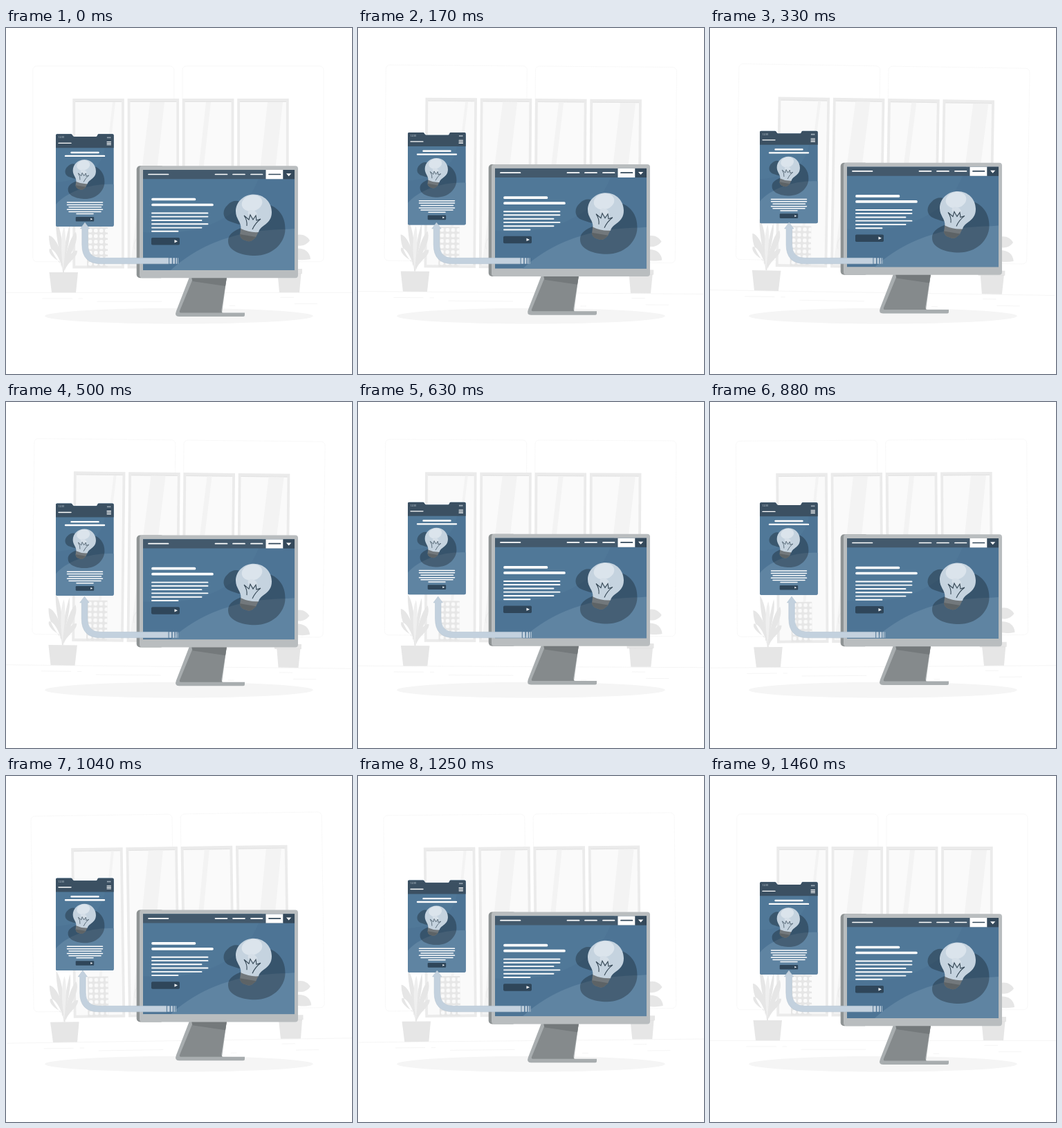
Animation of 500 by 500 pixels, one loop 1.5 s. Source, as an HTML page:

```html
<!DOCTYPE html>
<html lang="en">
<meta charset="utf-8">
<title>Responsive design</title>
<style>
  html, body { margin: 0; height: 100%; overflow: hidden; background: #fff }
  svg { display: block; width: 100vw; height: 100vh }
  .line { fill: none; stroke-linecap: round; stroke: #fff }
</style>
<svg viewBox="0 0 500 500">
  <defs>
    <clipPath id="screenClip"><path d="M198 205H417V350H198Z"/></clipPath>
    <clipPath id="phoneClip"><path id="phoneShape" d="M74 153.3H94Q95.300 153.300 96 155T98 157H130.500Q131.500 157 132.200 155T134 153.300H153.700Q155.700 153.300 155.700 155.300V284.700Q155.700 286.700 153.700 286.700H74Q72 286.700 72 284.700V155.300Q72 153.300 74 153.300Z"/></clipPath>
    <!-- Bulb and its shadow, centred on the glass -->
    <g id="bulb">
      <g opacity=".27">
        <path d="M-11 15C-18 20-26 15-33 13C-46 9-46-4-38-11C-30-20-19-18-15-12Z"/>
        <path d="M20-12C34-9 46 4 45.500 24C45 45 26 62 2 62C-18 62-37 55-37 41C-37 26-19 24-10 17Z"/>
      </g>
      <path d="M-18.500 20.500L7 27L3 35.500L-1 39Q-4 42-9 41L-15 39Q-19 37-20 32Z" fill="#72787c"/>
      <path d="M-20 31L3.500 35L-1 39Q-4 42-9 41L-15 39Q-19 37-20 32Z" fill="#5d6366"/>
      <path d="M-18.500 23C-18 13-26 9-26-2C-26-16-14-26.500 0-26.500C15-26.500 26-15 26-1C26 17 10 17 7 28Q-6 29-18.500 23Z" fill="#c5d3df"/>
      <ellipse cx="-2.500" cy="-14" rx="15" ry="11.500" transform="rotate(-14 -2.500 -14)" fill="#dbe4ec"/>
      <ellipse cx="-1" cy="2" rx="7" ry="5" transform="rotate(25)" fill="#d5dfe8"/>
      <path d="M-10 19Q-9 11-14 4L-7 10L-5 3L-1 10L3 4L4 11L10 9Q2 15-2 24" fill="none" stroke="#344654" stroke-width="1.100"/>
    </g>
    <g id="window">
      <path d="M0 0H74.500V245.500H0Z" fill="#ebebeb"/>
      <path d="M3.800 5H70.700V241.500H3.800Z" fill="#fafafa"/>
      <path d="M3.800 4.500H70.700" stroke="#e0e0e0" stroke-width=".8"/>
    </g>
    <pattern id="weave" x="118" y="289" width="8" height="8" patternUnits="userSpaceOnUse">
      <rect x="1" y="1" width="5.500" height="5.500" rx="2" fill="#fafafa"/>
    </pattern>
  </defs>

  <g id="room">
    <path d="M0 382.500H500M416.800 398.600h33.100M322.500 401.300h8.700M396.600 389.300h19.200M52.500 391h43.200M104.600 391h6.300M131.500 395.200h93.700" stroke="#ebebeb" stroke-width=".5"/>
    <g fill="none" stroke="#ebebeb" stroke-width=".35">
      <rect x="38.800" y="55" width="204" height="282.800" rx="5.700"/>
      <rect x="255" y="55" width="204" height="282.800" rx="5.700"/>
    </g>
    <use href="#window" x="96.300" y="102"/>
    <use href="#window" x="175.600" y="102"/>
    <use href="#window" x="254.900" y="102"/>
    <use href="#window" x="334.200" y="102"/>
    <path d="M154 107H158L132 343H128ZM208 107H229L203 343H180ZM289 107H296L270 343H263ZM378 107H400L374 343H352Z" fill="#f3f3f3"/>
    <path d="M117 288H147V346H117Z" fill="#e6e6e6"/>
    <path d="M117 288H147V346H117Z" fill="url(#weave)"/>
    <path d="M189 304Q183 312 186 320" fill="none" stroke="#ebebeb"/>
    <g fill="#e6e6e6">
      <path d="M82 353C81 330 72 310 72 279C79 288 82 310 83 330C84 318 88 297 92 284C95 305 85 325 84 353Z"/>
      <path d="M82 345C69 329 62 318 62 300C70 300 82 322 83 345ZM82 349C78 333 70 319 63 319C60 325 70 334 77 337ZM83 348C86 325 94 299 101 295C106 311 92 325 85 348ZM84 350C88 329 98 320 103 322C103 332 90 337 85 350Z"/>
      <path d="M62.500 353H104L101 382.300H66Z"/>
      <path d="M389 348H428V355H426.500L424 382H395L392.500 355H389Z"/>
      <path d="M415 301C425 296 434 299 439 307C432 317 420 316 412 311Z"/>
      <path d="M414 320C425 316 439 320 440 334C430 336 417 336 412 330Z"/>
    </g>
    <path d="M83 350C79 325 79 298 84 287C88 301 85 326 83 350" fill="#efefef"/>
    <path d="M389.500 355H426.500" stroke="#dedede" stroke-width=".7"/>
  </g>

  <ellipse cx="250" cy="416.200" rx="193.900" ry="11.300" fill="#f5f5f5"/>

  <g id="devices">
    <path d="M265 360L246 409Q243 417 250 417H343Q345 417 345 415V411.500H312L319 360Z" fill="#a8adaf"/>
    <path d="M271 360H319L311.300 407Q311 411.500 314 411.500H252Q250 411 251.300 408Z" fill="#858a8c"/>
    <path d="M268 360H319L317 373L269.500 366Z" fill="#74797b"/>
    <rect x="188.700" y="199.300" width="40" height="162" rx="5" fill="#8e9394"/>
    <rect x="193" y="199.300" width="229" height="162" rx="4" fill="#b9bdbf"/>
    <g clip-path="url(#screenClip)">
      <path d="M198 205H417V350H198Z" fill="#4d7495"/>
      <path d="M198 205H370C361 231 349 254 326 268C290 292 245 300 198 295Z" fill="#507898"/>
      <path d="M238 350C270 321 303 307 339 298C367 291 390 292 417 290V350Z" fill="#5f84a2"/>
      <path d="M198 205H417V218.300H198Z" fill="#43596c"/>
      <path d="M375.500 205H400.500V218.300H375.500Z" fill="#fff"/>
      <path d="M400.500 205H417V218.300H400.500Z" fill="#34495b"/>
    </g>
    <path d="M405 210.300H412.300L408.600 214.300Z" fill="#fff"/>
    <path class="line" stroke-width="1.700" d="M206 211.500H234.500M302.500 211.500H319.500M328 211.500H345M354 211.500H370.500"/>
    <path d="M380 211.500H396.500" stroke="#34495b" stroke-width="1.700" stroke-linecap="round"/>
    <path class="line" stroke-width="3.700" d="M212 247.500H272.500M212 255.500H298"/>
    <path class="line" stroke-width="1.900" d="M211 267.500H291.500M211 272.600H291.500M211 278H282.500M211 283.200H291.500M211 288.600H282.500M211 293.800H248.500"/>
    <rect x="210" y="303" width="41" height="10.500" rx="1.800" fill="#2f465a"/>
    <path d="M243.500 306L248 308.200L243.500 310.400Z" fill="#fff"/>
    <use href="#bulb" x="358" y="267"/>

    <use href="#phoneShape" fill="#4d7495"/>
    <g clip-path="url(#phoneClip)">
      <path d="M72 173H143C140 195 124 219 72 223Z" fill="#507898"/>
      <path d="M72 255C88 236 124 224 156 226V287H72Z" fill="#5f84a2"/>
      <path d="M72 153H156V173.300H72Z" fill="#3b5062"/>
    </g>
    <text x="75.800" y="159.300" font-family="Lato, sans-serif" font-size="3.200" fill="#c5d0d9">12:30</text>
    <path d="M146 158.300H151.500" stroke="#a9b6c1" stroke-width="1.800" stroke-dasharray="1.500 .4"/>
    <path class="line" stroke-width="1.400" d="M76 166.400H94"/>
    <path class="line" stroke-width="1.100" d="M146 164.500H151.500M146 166.600H151.500M146 168.700H151.500"/>
    <path class="line" stroke-width="2.400" d="M94.500 180H133.500M86 184.900H142"/>
    <use href="#bulb" transform="translate(113.300 207.300) scale(.64)"/>
    <path class="line" stroke-width="1.500" d="M88.500 252H139.500M88.500 255.400H139.500M91 258.800H137.500M88.500 262.200H139.500M91 265.400H137M102 268.500H126"/>
    <rect x="100.700" y="272.900" width="26.500" height="6.600" rx="1.100" fill="#2f465a"/>
    <path d="M122.300 274.800L125.200 276.200L122.300 277.600Z" fill="#fff"/>
  </g>

  <g id="arrow">
    <path d="M114 281L120.700 290H118.300V313Q118.300 332.300 137 332.300H235V340.800H137Q109.800 340.800 109.800 313V290H107.300Z" fill="#c3d1de" stroke="#b1c1cf" stroke-width=".5"/>
    <path d="M236.200 332.300h3.600v8.500h-3.600zM241.300 332.300h2.700v8.500h-2.700zM245.400 332.300h1.600v8.500h-1.600zM248.300 332.300h.8v8.500h-.8z" fill="#c3d1de"/>
  </g>
</svg>
<script>
  const FPS = 24, STEPS = 35, LOOP = 1500;
  const part = id => document.getElementById(id);
  const room = part('room'), devices = part('devices'), arrow = part('arrow');

  // Evenly spaced keys, linear in between
  function along(keys, u) {
    const x = u * (keys.length - 1), i = Math.min(Math.floor(x), keys.length - 2);
    return keys[i] + (keys[i + 1] - keys[i]) * (x - i);
  }

  function draw(now) {
    const step = Math.min(STEPS, Math.floor((now % LOOP + 4.9) * FPS / 1000));
    const u = step / STEPS;
    room.setAttribute('transform', `rotate(${along([0, 1, 0, -1, 0], u)} 250 250)`);
    devices.setAttribute('transform', `translate(0 ${along([0, -10, 0], u)})`);
    arrow.setAttribute('transform', `translate(${along([0, -1, 2, -4, 4, -4, 4, -4, 2, -1, 0], u)} 0)`);
    requestAnimationFrame(draw);
  }
  draw(0);
</script>
</html>
```
